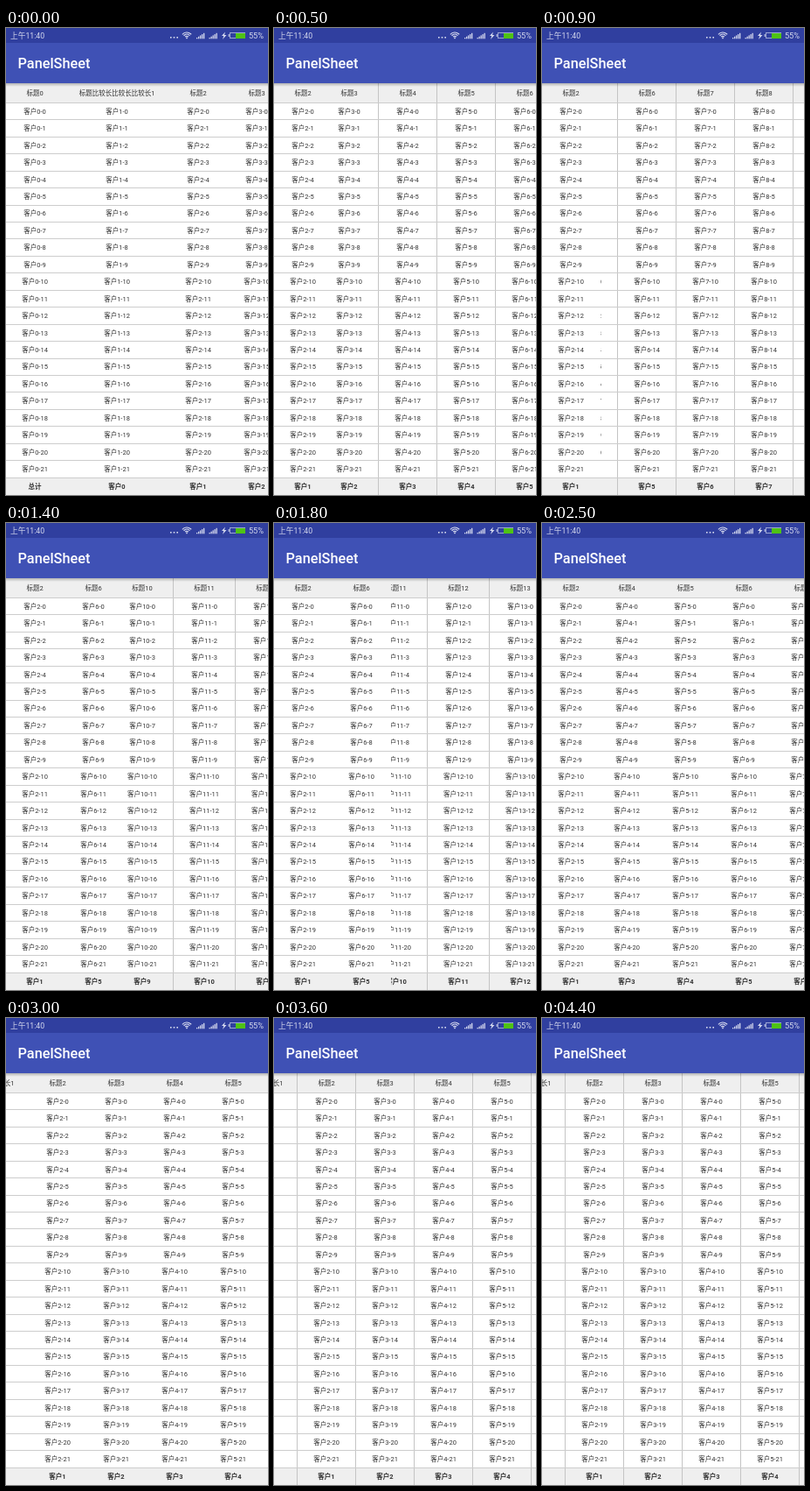
These frames come from a looping animation (300x533 px, 4500 ms). An HTML page with a canvas:

```html
<!DOCTYPE html>
<html lang="zh">
<head>
<meta charset="utf-8">
<style>
  html, body { margin: 0; width: 300px; height: 533px; overflow: hidden; background: #fff; }
  canvas { display: block; }
</style>
</head>
<body>
<canvas id="stage" width="300" height="533"></canvas>
<script>
const c = document.getElementById('stage').getContext('2d');
const LOOP = 4500, STEP = 100;
const FONT = 'Roboto, "Noto Sans CJK SC", "Noto Sans CJK", sans-serif';
const BAR = 63, ROWS = 22, TOP = 85.4, ROW_H = 19.444, FOOT = Math.floor(TOP + ROWS * ROW_H);
const PINNED = [2, 6];

// Column edges: column 1 has a long title, two-digit columns are a bit wider.
const colWidth = n => n === 1 ? 119.73 : n < 10 ? 66.95 : 70.95;
const left = [0];
for (let n = 0; n < 20; n++) left.push(left[n] + colWidth(n));

// Horizontal scroll: [ms, px]
const keys = [[0, 0], [900, 368.08], [1400, 601.83], [1800, 688.78], [2000, 694],
  [2500, 256.68], [3000, 160.78], [3600, 160.18], [LOOP, 160.18]];
const slopes = keys.slice(1).map((k, i) => (k[1] - keys[i][1]) / (k[0] - keys[i][0]));
const tangents = keys.map((_, i) => {
  const a = slopes[i - 1] ?? slopes[i], b = slopes[i] ?? a;
  return a * b > 0 ? 2 * a * b / (a + b) : 0;
});

// Monotone cubic through the keys
function scrollAt(t) {
  let i = 0;
  while (t >= keys[i + 1][0]) i++;
  const [t0, y0] = keys[i], [t1, y1] = keys[i + 1];
  const h = t1 - t0, u = (t - t0) / h, v = 1 - u;
  return y0 * (1 + 2 * u) * v * v + tangents[i] * h * u * v * v
    + y1 * u * u * (3 - 2 * u) - tangents[i + 1] * h * u * u * v;
}

function rect(color, x, y, w, h) {
  c.fillStyle = color;
  c.fillRect(x, y, w, h);
}

function text(str, x, y, size, color, align = 'center', weight = 400) {
  c.font = `${weight} ${size}px ${FONT}`;
  c.fillStyle = color;
  c.textAlign = align;
  c.fillText(str, x, y);
}

function drawColumn(n, x) {
  const w = colWidth(n), mid = Math.round(x + w / 2), ink = '#333';
  const title = n === 1 ? '标题比较长比较长比较长1' : '标题' + n;
  text(title, mid, 77.2, 7.5, ink);
  for (let r = 0; r < ROWS; r++)
    text(`客户${n}-${r}`, mid, TOP + (r + .5) * ROW_H + 2.7, 7.5, ink);
  text(n ? '客户' + (n - 1) : '总计', mid, 526, 7.5, ink, 'center', 700);

  // A hairline shows only when it lands on the pixel grid.
  const edge = x + w, px = Math.floor(edge);
  if (edge - px < .55) rect('#c4c4c4', px, BAR, 1, 533 - BAR);
}

function drawTable(scroll) {
  rect('#fff', 0, BAR, 300, 533 - BAR);
  rect('#efefef', 0, BAR, 300, 85 - BAR);
  rect('#efefef', 0, FOOT, 300, 20);

  const fixed = [];
  let pinX = 0;
  for (const n of PINNED)
    if (left[n] - scroll < pinX) {
      fixed.push([n, pinX]);
      pinX += colWidth(n);
    }

  c.save();
  c.beginPath();
  c.rect(pinX, BAR, 300 - pinX, 533 - BAR);
  c.clip();
  for (let n = 0; n < 20; n++) {
    const x = left[n] - scroll;
    if (x < 300 && x + colWidth(n) > pinX && !fixed.some(f => f[0] === n)) drawColumn(n, x);
  }
  c.restore();
  for (const [n, x] of fixed) drawColumn(n, x);

  for (let r = 0; r <= ROWS; r++) rect('#cdcdcd', 0, Math.floor(TOP + r * ROW_H), 300, 1);
}

function drawSignal(x) {
  for (let i = 0; i < 5; i++) rect('#d5d9ee', x + i * 2, 11 - i * 1.3, 1.3, 1.3 + i * 1.3);
}

function drawBars() {
  const shade = c.createLinearGradient(0, BAR, 0, BAR + 4);
  shade.addColorStop(0, 'rgba(0,0,0,.25)');
  shade.addColorStop(1, 'rgba(0,0,0,0)');
  rect(shade, 0, BAR, 300, 4);
  rect('#3f51b5', 0, 17, 300, BAR - 17);
  rect('#303f9f', 0, 0, 300, 17);
  text('PanelSheet', 13.5, 45.7, 16.3, '#fff', 'left', 500);

  const pale = '#d5d9ee';
  text('上午11:40', 5, 12, 8.7, pale, 'left');
  text('55%', 295, 12, 9.2, pale, 'right');
  for (const x of [188, 191.7, 195.4]) rect(pale, x, 10, 1.6, 1.6);

  c.strokeStyle = pale;
  c.lineWidth = 1.2;
  for (const r of [2.4, 4.6, 6.8]) {
    c.beginPath();
    c.arc(207, 11.8, r, -Math.PI * .77, -Math.PI * .23);
    c.stroke();
  }
  rect(pale, 206.2, 10.6, 1.6, 1.6);
  drawSignal(218);
  drawSignal(232.5);

  c.fillStyle = pale;
  c.fill(new Path2D('M251 4.5L247 9H249.3L248 13L252.5 8H250Z'));
  c.strokeStyle = '#9ca5d3';
  c.lineWidth = 1;
  c.strokeRect(256.5, 5.5, 17, 6);
  rect('#9ca5d3', 254.5, 7, 1.5, 3);
  rect('#4fc314', 263, 6, 11, 6);
}

function frame(now) {
  const t = Math.floor(now % LOOP / STEP) * STEP;
  drawTable(scrollAt(t));
  drawBars();
  requestAnimationFrame(frame);
}
frame(0);
</script>
</body>
</html>
```
